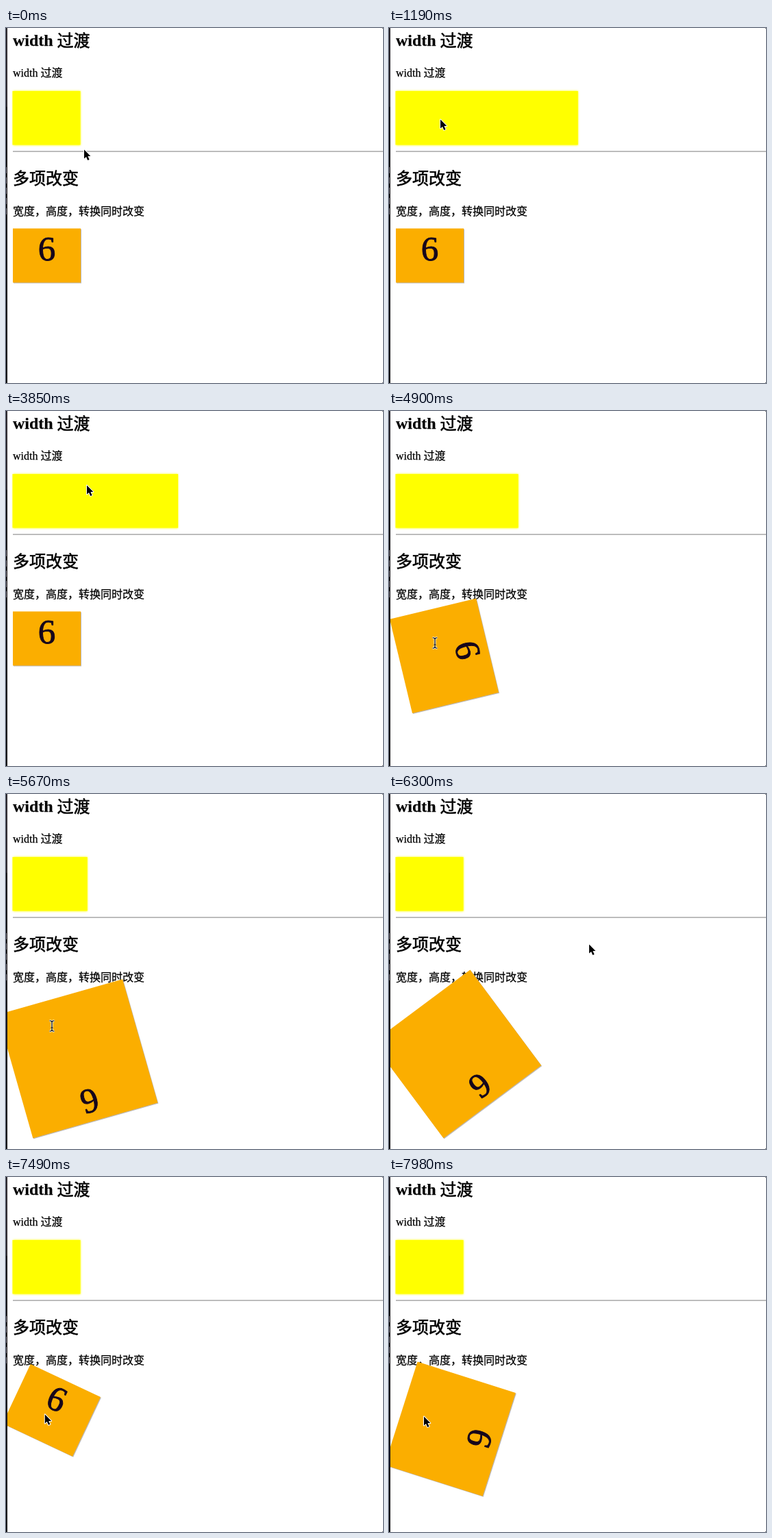
An HTML page with a canvas that plays this animation: 550x518 px, repeating every 8 s.

```html
<!DOCTYPE html>
<html lang="zh-CN">
<head>
<meta charset="utf-8">
<title>Transitions</title>
<style>
html, body { margin: 0; width: 100%; height: 100%; overflow: hidden; background: #fff; }
canvas { display: block; }
</style>
</head>
<body>
<canvas id="stage" width="550" height="518"></canvas>
<script>
const ctx = document.getElementById('stage').getContext('2d');
const LOOP = 8000, STEP = 70, DURATION = 2000;
const FONT = '"Liberation Serif", "Noto Sans CJK SC", "Noto Sans CJK", serif';

// Times at which hover alternately begins and ends
const YELLOW_HOVER = [98, 1895, 3055, 4260];
const ORANGE_HOVER = [4385, 6000, 7325];

// Places where the pointer rests
const STOPS = [
  { x: 114, y: 178, from: 0, to: 0 },
  { x: 75, y: 134, from: 400, to: 1650 },
  { x: 142, y: 283, from: 2500, to: 2750 },
  { x: 118, y: 109, from: 3300, to: 4050 },
  { x: 67, y: 339, from: 4450, to: 5750, beam: true },
  { x: 292, y: 220, from: 6250, to: 6900 },
  { x: 51, y: 350, from: 7550, to: LOOP }
];

const lerp = (a, b, k) => a + (b - a) * k;
const smooth = k => k * k * (3 - 2 * k);

// CSS "ease": cubic-bezier(.25, .1, .25, 1)
function ease(x) {
  if (x <= 0) return 0;
  if (x >= 1) return 1;
  const curve = (u, a, b) => 3 * u * (1 - u) * (1 - u) * a + 3 * u * u * (1 - u) * b + u * u * u;
  let lo = 0, hi = 1;
  for (let i = 0; i < 24; i++) {
    const mid = (lo + hi) / 2;
    if (curve(mid, 0.25, 0.25) < x) lo = mid; else hi = mid;
  }
  return curve(lo, 0.1, 1);
}

function progress(toggles, t) {
  let from = 0, to = 0, start = 0;
  const at = time => lerp(from, to, ease((time - start) / DURATION));
  toggles.forEach((time, i) => {
    if (time > t) return;
    from = at(time);
    to = i % 2 ? 0 : 1;
    start = time;
  });
  return at(t);
}

function pointerAt(t) {
  const i = STOPS.findIndex(s => t <= s.to);
  const next = STOPS[i];
  if (t >= next.from) return next;
  const last = STOPS[i - 1];
  const k = smooth((t - last.to) / (next.from - last.to));
  return { x: lerp(last.x, next.x, k), y: lerp(last.y, next.y, k) };
}

function rect(color, x, y, w, h) {
  ctx.fillStyle = color;
  ctx.fillRect(x, y, w, h);
}

// A thin outline adds a little weight to the glyphs
function text(str, x, y, size, { weight = 'normal', outline = 0.25, color = '#000' } = {}) {
  ctx.font = `${weight} ${size}px ${FONT}`;
  ctx.fillStyle = ctx.strokeStyle = color;
  ctx.lineWidth = outline;
  ctx.lineJoin = 'round';
  ctx.fillText(str, x, y);
  ctx.strokeText(str, x, y);
}

function drawPage() {
  rect('#fff', 0, 0, 550, 518);
  ctx.textAlign = 'left';
  text('width', 10, 26, 24, { weight: 'bold' });
  text('过渡', 74.5, 26.5, 24, { outline: 0.6 });
  text('width 过渡', 10, 71, 16);
  rect('#c8c8c8', 10, 179, 540, 1);
  rect('#b2b2b2', 10, 180, 540, 1);
  text('多项改变', 10, 228, 24, { outline: 0.6 });
  text('宽度，高度，转换同时改变', 10, 272.5, 16);
}

function drawYellow(p) {
  ctx.save();
  ctx.shadowColor = '#ff0';
  ctx.shadowBlur = 3;
  rect('#ff0', 9.5, 92, 99 + 198 * p, 78.5);
  ctx.restore();
}

function drawOrange(p) {
  const w = 99 + 99 * p, h = 79 + 119 * p;
  ctx.save();
  ctx.translate(10 + w / 2, 292.5 + h / 2);
  ctx.rotate(Math.PI * p);
  ctx.save();
  ctx.shadowColor = '#bdb8b4';
  ctx.shadowOffsetX = ctx.shadowOffsetY = 1;
  rect('#fbae00', -w / 2, -h / 2, w, h);
  ctx.restore();
  ctx.textAlign = 'center';
  text('6', 0, 46.5 - h / 2, 51, { outline: 0.9, color: '#16061c' });
  ctx.restore();
}

function drawWindowEdge() {
  rect('#2b292e', 0, 0, 2, 115);
  rect('#151317', 0, 115, 2, 403);
  for (let y = 203; y < 275; y += 15) rect('#77757c', 0, y, 1, 9);
  for (const y of [0, 517]) rect('#555', 549, y, 1, 1);
}

const ARROW = new Path2D('M0 0V13L3 10.4L5.2 15.4L7.6 14.4L5.4 9.6H9.3Z');
const BEAM = new Path2D('M-3.5 -7.5H-1.5L0 -6L1.5 -7.5H3.5M0 -6V6M-3.5 7.5H-1.5L0 6L1.5 7.5H3.5M-1.5 2.5H1.5');

function drawPointer({ x, y, beam }) {
  const shape = beam ? BEAM : ARROW;
  ctx.save();
  ctx.translate(x, y - 0.5);
  ctx.lineJoin = 'round';
  ctx.strokeStyle = '#fff';
  ctx.lineWidth = beam ? 3 : 2;
  ctx.stroke(shape);
  ctx.fillStyle = ctx.strokeStyle = '#000';
  ctx.lineWidth = 1.2;
  if (beam) ctx.stroke(shape); else ctx.fill(shape);
  ctx.restore();
}

function frame(now) {
  const t = Math.floor((now % LOOP) / STEP) * STEP;
  drawPage();
  drawYellow(progress(YELLOW_HOVER, t));
  drawOrange(progress(ORANGE_HOVER, t));
  drawWindowEdge();
  drawPointer(pointerAt(t));
}

const begin = performance.now();
function tick() {
  frame(performance.now() - begin);
  requestAnimationFrame(tick);
}
tick();
</script>
</body>
</html>
```
